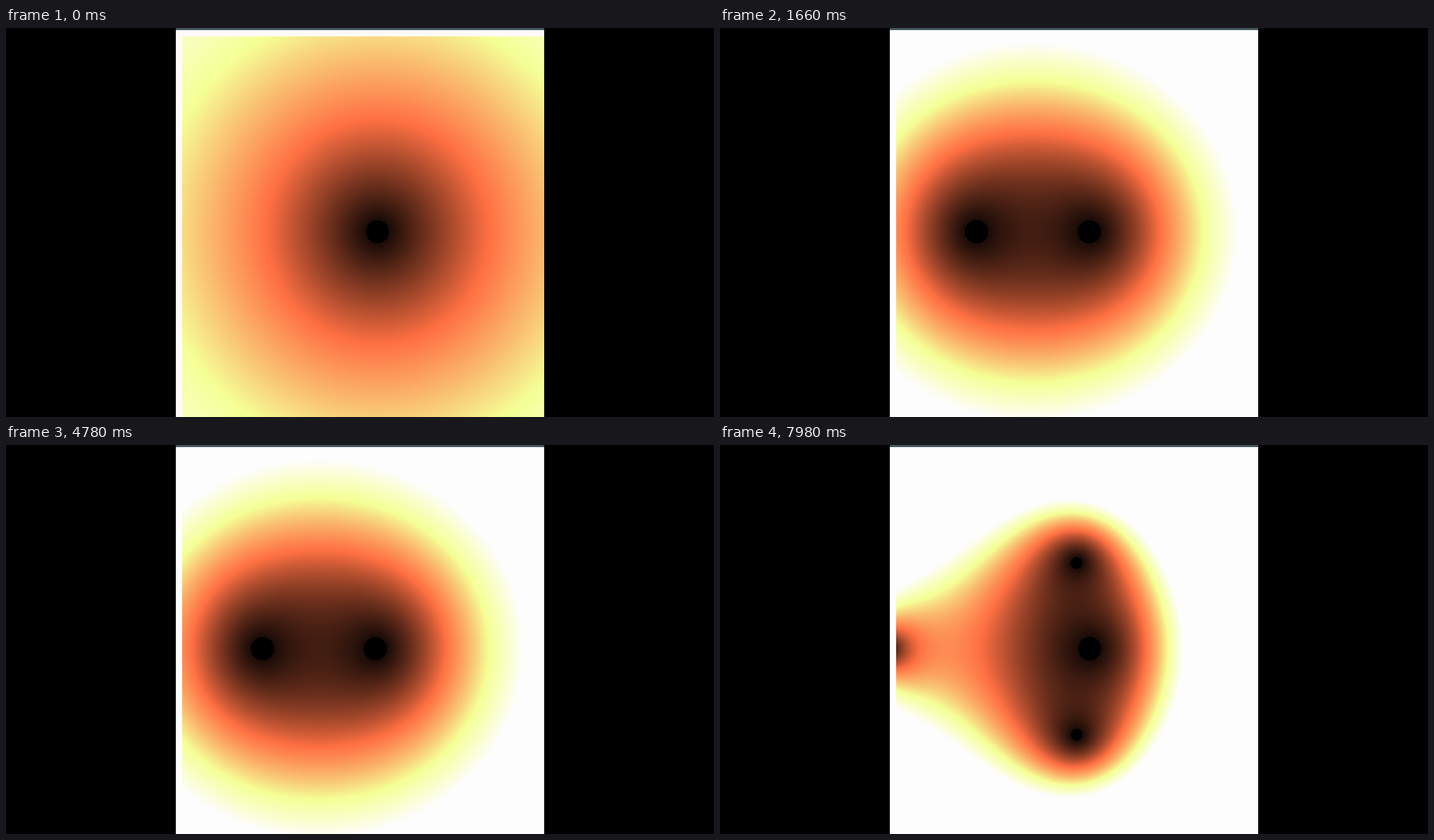
These frames come from a looping animation (1009 by 555 pixels, 8000 ms). An HTML page with a canvas:

```html
<!DOCTYPE html>
<html lang="en">
<head>
<meta charset="utf-8">
<title>Iterated polynomial magnitude</title>
<style>
  html, body { margin: 0; width: 100%; height: 100%; overflow: hidden; background: #000; }
  #page { position: absolute; left: 242px; top: 0; width: 525px; height: 555px; background: #fdfdfd; }
  #bar { position: absolute; left: 0; top: 0; width: 100%; height: 3px; background: #46565f; }
  canvas { position: absolute; left: 0; top: 3px; opacity: 0; animation: 8s step-end infinite; }
  #p1 { animation-name: first; }
  #p2 { animation-name: second; }
  #p3 { animation-name: third; }
  @keyframes first { 0% { opacity: 1 } 19.25%, 100% { opacity: 0 } }
  @keyframes second { 0% { opacity: 0 } 19.25% { opacity: 1 } 76.5%, 100% { opacity: 0 } }
  @keyframes third { 0% { opacity: 0 } 76.5%, 100% { opacity: 1 } }
</style>
</head>
<body>
<div id="page">
  <div id="bar"></div>
  <canvas id="p1" width="525" height="552"></canvas>
  <canvas id="p2" width="525" height="552"></canvas>
  <canvas id="p3" width="525" height="552"></canvas>
</div>
<script>
const RAMP = [[0, 0, 0], [255, 112, 67], [245, 255, 150], [253, 253, 253]];
const UNIT_X = 164, UNIT_Y = 165.5, STEP = 0.97, HOLE = 0.1;
const clamp = v => Math.min(1, Math.max(0, v));

// |z_n| of z -> z² + c, starting at z = 0
function magnitude(cr, ci, n) {
  let zr = 0, zi = 0;
  while (n--) [zr, zi] = [zr * zr - zi * zi + cr, 2 * zr * zi + ci];
  return Math.hypot(zr, zi);
}

function shade(v) {
  const t = Math.min(v / STEP, 2.9999), i = Math.floor(t), f = t - i;
  const edge = clamp((v - HOLE) * 160 + 0.5);
  return RAMP[i].map((a, k) => (a + (RAMP[i + 1][k] - a) * f) * edge);
}

function plot(id, n, cx, margin) {
  const canvas = document.getElementById(id), ctx = canvas.getContext('2d');
  const left = 9, top = 9, w = canvas.width - left, h = canvas.height - top;
  ctx.fillStyle = margin;
  ctx.fillRect(0, 0, canvas.width, canvas.height);
  const img = ctx.createImageData(w, h);
  for (let y = 0, p = 0; y < h; y++) {
    for (let x = 0; x < w; x++, p += 4) {
      const cr = (x + 251.5 - cx) / UNIT_X, ci = (y + 12.5 - 290.7) / UNIT_Y;
      img.data.set([...shade(magnitude(cr, ci, n)), 255], p);
    }
  }
  ctx.putImageData(img, left, top);
}

plot('p1', 1, 529.5, '#fffafa');
plot('p2', 2, 528, '#fdfdfd');
plot('p3', 3, 528.5, '#fdfdfd');
</script>
</body>
</html>
```
